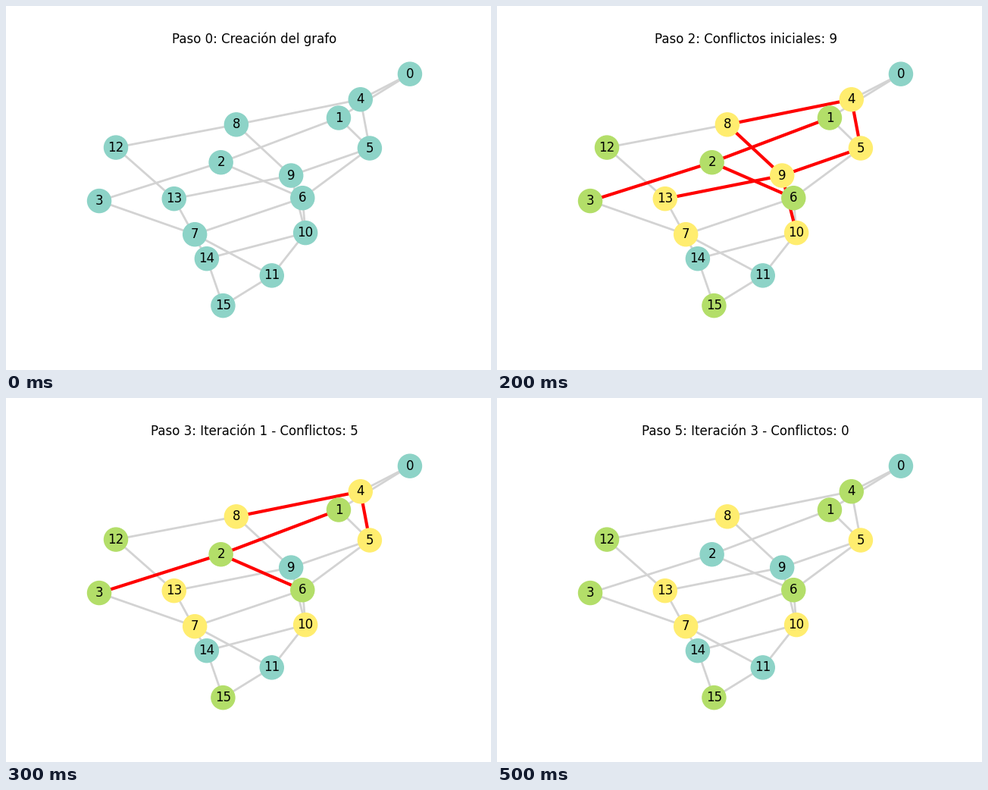
Write a matplotlib script that moves like this. It is 640 px wide and 480 px high and loops after 0.6 s.

```python
import numpy as np
import matplotlib.pyplot as plt
from matplotlib.animation import FuncAnimation
from matplotlib.collections import LineCollection

SIDE = 4
COUNT = SIDE * SIDE
PALETTE = ["#8dd3c7", "#b3de69", "#ffed6f"]
START = "0111221222201201"  # palette index of each node
REPAIRS = 3
FONT = {"size": 12, "family": "DejaVu Sans"}

# Neighbours on a square lattice.
EDGES = [(n, n + 1) for n in range(COUNT) if n % SIDE < SIDE - 1]
EDGES += [(n, n + SIDE) for n in range(COUNT - SIDE)]
LINKED = np.zeros((COUNT, COUNT))
for a, b in EDGES:
    LINKED[a, b] = LINKED[b, a] = 1


def spring_layout(seed=42, iterations=50):
    """Force-directed placement: links attract, all pairs repel."""
    pos = np.random.RandomState(seed).rand(COUNT, 2)
    rest = np.sqrt(1 / COUNT)
    heat = 0.1 * np.ptp(pos, axis=0).max()
    cooling = heat / (iterations + 1)
    for _ in range(iterations):
        delta = pos[:, None] - pos[None]
        dist = np.maximum(np.linalg.norm(delta, axis=-1), 0.01)
        pull = rest**2 / dist**2 - LINKED * dist / rest
        force = np.einsum("ijk,ij->ik", delta, pull)
        length = np.linalg.norm(force, axis=-1)
        length = np.where(length < 0.01, 0.1, length)
        move = force * (heat / length)[:, None]
        pos += move
        heat -= cooling
        if np.linalg.norm(move) / COUNT < 1e-4:
            break
    return pos


def repair(colors):
    """Give the most conflicted node its least used neighbouring colour."""
    clashes = [LINKED[n] @ (colors == colors[n]) for n in range(COUNT)]
    worst = int(np.argmax(clashes))
    uses = [LINKED[worst] @ (colors == c) for c in range(len(PALETTE))]
    fixed = colors.copy()
    fixed[worst] = np.argmin(uses)
    return fixed


def coloring(step):
    if step == 0:
        return np.zeros(COUNT, int)
    colors = np.array([int(c) for c in START])
    for _ in range(step - 2):
        colors = repair(colors)
    return colors


def caption(step, conflicts):
    if step == 0:
        text = "Creación del grafo"
    elif step == 1:
        text = "Asignación aleatoria de colores"
    elif step == 2:
        text = f"Conflictos iniciales: {conflicts}"
    else:
        text = f"Iteración {step - 2} - Conflictos: {conflicts}"
    return f"Paso {step}: {text}"


POS = spring_layout()


def segments(edges):
    return [(POS[a], POS[b]) for a, b in edges]


def padded(values, scale=1.1**2):
    middle = (values.min() + values.max()) / 2
    reach = np.ptp(values) / 2 * scale
    return middle - reach, middle + reach


fig = plt.figure(figsize=(6.4, 4.8), dpi=100, facecolor="white")
ax = fig.subplots()
ax.set(xlim=padded(POS[:, 0]), ylim=padded(POS[:, 1]))
ax.axis("off")

ax.add_collection(LineCollection(segments(EDGES), colors="lightgray",
                                 linewidths=2, zorder=1), autolim=False)
clash_lines = LineCollection([], colors="red", linewidths=3, zorder=1.5)
ax.add_collection(clash_lines, autolim=False)
nodes = ax.scatter(*POS.T, s=500, c=PALETTE[0], linewidths=1, zorder=2)
for n, (x, y) in enumerate(POS):
    ax.text(x, y, str(n), ha="center", va="center", zorder=3, **FONT)
title = ax.set_title("", **FONT)


def draw(step):
    colors = coloring(step)
    clashes = [(a, b) for a, b in EDGES if step and colors[a] == colors[b]]
    clash_lines.set_segments(segments(clashes))
    shades = [PALETTE[c] for c in colors]
    nodes.set_facecolor(shades)
    nodes.set_edgecolor(shades)
    title.set_text(caption(step, len(clashes)))
    return clash_lines, nodes, title


anim = FuncAnimation(fig, draw, frames=REPAIRS + 3, interval=100,
                     repeat=True, repeat_delay=0, blit=False)
plt.show()
```
